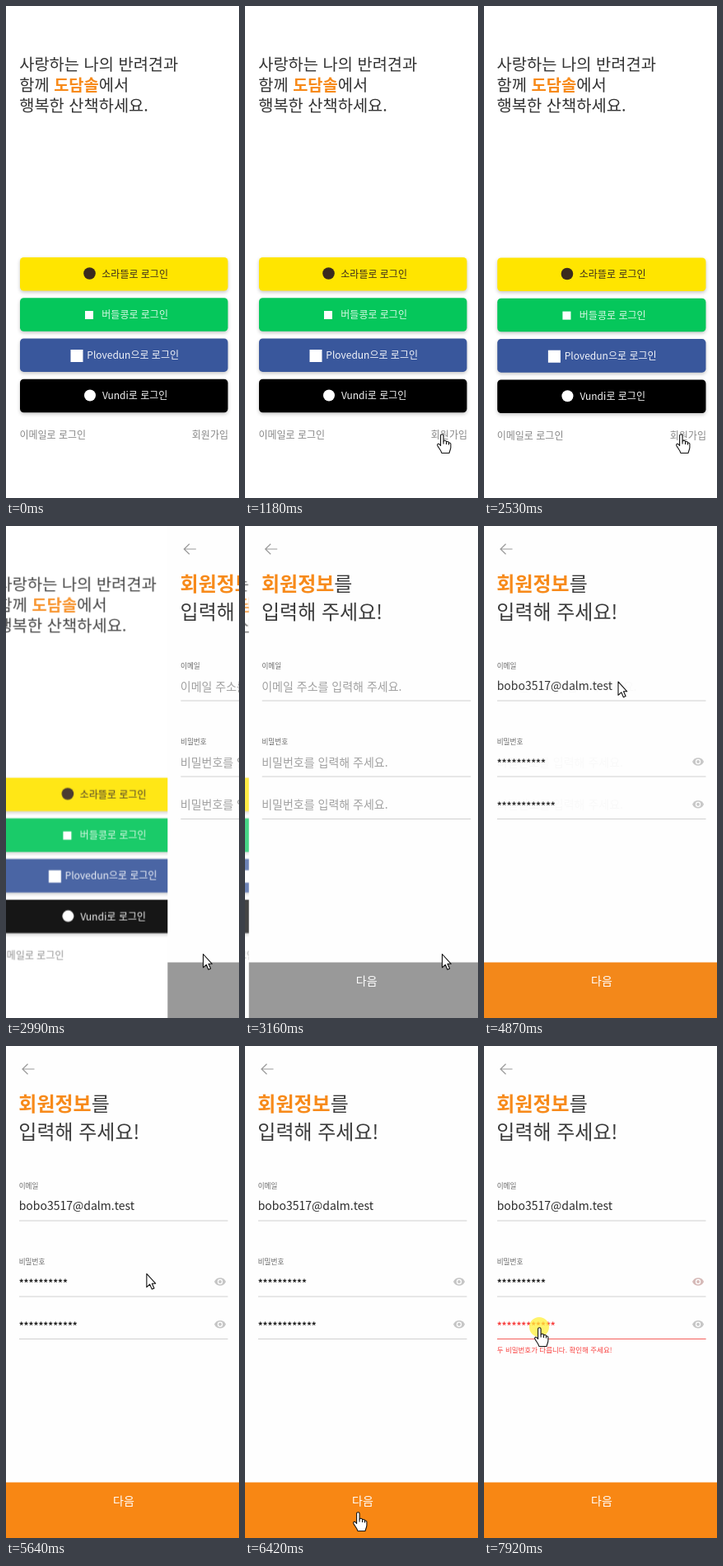
Animation of 283x597 px, one loop 8 s. Source, as an HTML page:

```html
<!DOCTYPE html>
<html lang="ko">
<head>
<meta charset="utf-8">
<style>
  html, body { margin: 0; height: 100%; overflow: hidden; background: #fff; }
  svg { display: block; width: 100vw; height: 100vh; font-family: "Noto Sans CJK KR", "Noto Sans CJK", "Noto Sans", sans-serif; }
  .button { filter: drop-shadow(0 2px 2px rgba(0, 0, 0, .22)); }
  .bold { font-weight: 700; fill: #f78a1a; }
  .pointer { fill: #fff; stroke: #111; stroke-width: 1.1; stroke-linejoin: round; }
</style>
</head>
<body>
<svg id="stage" viewBox="0 0 283 597"></svg>
<script>
const text = (x, y, size, fill, str, more = '') =>
  `<text x="${x}" y="${y}" font-size="${size}" fill="${fill}" ${more}>${str}</text>`;

const button = (y, bg, fg, x, label, icon) =>
  `<rect class="button" x="17" y="${y}" width="252.5" height="40.5" rx="4.5" fill="${bg}"/>` +
  icon + text(x, y + 24.7, 12, fg, label);

const dot = (x, y, r, fill) => `<circle cx="${x}" cy="${y}" r="${r}" fill="${fill}"/>`;
const box = (x, y, s) => `<rect x="${x}" y="${y}" width="${s}" height="${s}" fill="#fff"/>`;
const rule = (y, stroke, more = '') => `<path d="M16 ${y}H269.5" stroke="${stroke}" ${more}/>`;
const stars = (y, n, fill) => text(15.7, y, 11.7, fill, '*'.repeat(n), 'font-weight="700"');
const eye = (y, id) =>
  `<g id="${id}" fill="#c6c6c6" transform="translate(252.4 ${y - 7.6}) scale(.636)">
    <path d="M12 4.5C7 4.5 2.7 7.6 1 12c1.7 4.4 6 7.5 11 7.5s9.3-3.1 11-7.5c-1.7-4.4-6-7.5-11-7.5z"/>
    <circle cx="12" cy="12" r="5" fill="#fff"/><circle cx="12" cy="12" r="3"/></g>`;

const hint = '비밀번호를 입력해 주세요.';

stage.innerHTML = `
<g id="login">
  ${text(16.2, 78, 19.8, '#333', '사랑하는 나의 반려견과')}
  ${text(16.2, 103, 19.8, '#333', '함께 <tspan class="bold">도담솔</tspan>에서')}
  ${text(16.2, 128, 19.8, '#333', '행복한 산책하세요.')}
  ${button(305, '#ffe500', '#3a2d1c', 116.3, '소라뜰로 로그인', dot(101.5, 324.5, 7.3, '#3a2a1e'))}
  ${button(354.2, '#05c75b', '#d9f8e5', 116.3, '버들콩로 로그인', box(96, 370, 10))}
  ${button(403.4, '#39579c', '#f3f5fa', 98.3, 'Plovedun으로 로그인', box(78.5, 417, 15))}
  ${button(452.7, '#000', '#f4f4f4', 117, 'Vundi로 로그인', dot(102, 472.5, 7, '#fff'))}
  ${text(16.5, 524.6, 12, '#888', '이메일로 로그인')}
  ${text(270, 524.6, 12, '#888', '회원가입', 'text-anchor="end"')}
</g>
<g id="form">
  <rect width="283" height="597" fill="#fefefe"/>
  <path d="M34.5 28H20M26.5 21.7L20 28l6.5 6.3" fill="none" stroke="#999" stroke-width="1.2"/>
  ${text(15.3, 79, 24, '#3b3b3b', '<tspan class="bold">회원정보</tspan>를')}
  ${text(15.3, 113, 24, '#3b3b3b', '입력해 주세요!')}
  ${text(15.7, 172.6, 8.6, '#666', '이메일')}
  ${text(15.7, 264.6, 8.6, '#666', '비밀번호')}
  ${rule(212, '#d0d0d0')}${rule(304, '#d0d0d0')}${rule(355.5, '#d0d0d0')}
  <g id="hints">
    ${text(15.5, 199.7, 14, '#a0a0a0', '이메일 주소를 입력해 주세요.')}
    ${text(15.5, 291.7, 14, '#a0a0a0', hint)}
    ${text(15.5, 343.2, 14, '#a0a0a0', hint)}
  </g>
  <g id="values">
    ${text(15.7, 199.4, 14, '#2b2b2b', 'bobo3517@dalm.test')}
    ${stars(292, 10, '#222')}
    <g id="repeat">${stars(343.5, 12, '#222')}</g>
    ${eye(286, 'eye1')}${eye(337.7, 'eye2')}
  </g>
  <g id="error">
    ${stars(343.5, 12, '#f8403f')}
    ${rule(355.5, '#f4605c')}
    ${text(15.7, 371.6, 8.5, '#f8403f', '두 비밀번호가 다릅니다. 확인해 주세요!')}
  </g>
  <rect id="bar" y="529.5" width="283" height="68"/>
  ${text(143, 557, 14, '#fff', '다음', 'text-anchor="middle"')}
</g>
<g id="cursor">
  <circle id="glow" r="12" fill="#ffee32" opacity=".72"/>
  <path id="arrow" class="pointer" d="M.5 .5V16.8L4.3 13.3l2.6 5.9 2.7-1.2-2.6-5.7H11.3Z"/>
  <g id="hand" class="pointer" transform="translate(.5 .5)">
    <path d="M-1.9 2C-1.9-.4 1.6-.4 1.6 2V9C1.6 7.3 5 7.4 5 9.2V10C5 8.6 8 8.7 8 10.4v.8C8 10 10.4 10.2 10.4 12v4c0 3-1.5 4-1.8 7H-.6C-1 20-4.7 16.5-5.8 13.6-6.2 11.8-4.2 11-3 12.6L-1.9 14Z"/>
    <path d="M1.6 9v3M5 10v2.5M8 11v2" fill="none"/>
  </g>
</g>`;

const $ = id => document.getElementById(id);
const set = (id, attr, value) => $(id).setAttribute(attr, value);
const show = (id, on) => set(id, 'visibility', on ? 'visible' : 'hidden');
const clamp = u => Math.max(0, Math.min(1, u));
const settle = (t, start, length) => 1 - (1 - clamp((t - start) / length)) ** 3;
const mix = (a, b, p) => `rgb(${a.map((v, i) => Math.round(v + (b[i] - v) * p))})`;

const speedUp = u => u * u;
const slowDown = u => u * (2 - u);
const smooth = u => u * u * (3 - 2 * u);

// time, x, y, easing towards that point
const path = [
  [40, 253, 602], [500, 234, 516, slowDown], [860, 234, 516, smooth], [1180, 239, 519, smooth],
  [3180, 239, 519, smooth], [3770, 189, 401, speedUp], [4060, 167, 179, slowDown],
  [4200, 167, 179, smooth], [4260, 162.5, 188, smooth], [4920, 162.5, 188.5, smooth],
  [5500, 173, 253, speedUp], [6350, 137, 565, smooth], [6850, 137, 565, smooth],
  [7180, 141, 491, speedUp], [7650, 67, 333, slowDown], [7720, 67, 341, smooth]
];
const clicks = [[2260, 2400], [4330, 4460], [6550, 6690], [7920, 8000]];

function cursorAt(t) {
  const i = path.findIndex(k => k[0] > t);
  if (i === 0) return path[0].slice(1, 3);
  if (i < 0) return path[path.length - 1].slice(1, 3);
  const [t0, x0, y0] = path[i - 1], [t1, x1, y1, ease] = path[i];
  const p = ease((t - t0) / (t1 - t0));
  return [x0 + (x1 - x0) * p, y0 + (y1 - y0) * p];
}

function draw(t) {
  const slide = settle(t, 2960, 270);
  const filled = settle(t, 4680, 300);
  const failed = settle(t, 6700, 300);

  // the login page grows slightly once pressed
  const grow = t < 2400 ? 0 : t < 2530 ? .5 : 1;
  set('login', 'transform', `translate(${-85 * slide} 0) translate(285 70)
    scale(${1 + .003 * grow} ${1 + .002 * grow}) translate(-285 -70)`);
  set('login', 'opacity', 1 - .27 * slide);
  set('form', 'transform', `translate(${283 * (1 - slide)} 0)`);
  show('form', slide > 0);

  set('hints', 'opacity', 1 - filled);
  set('values', 'opacity', filled);
  set('bar', 'fill', mix([153, 153, 153], [248, 135, 20], filled));
  set('error', 'opacity', failed);
  set('repeat', 'opacity', 1 - failed);
  set('eye1', 'fill', mix([198, 198, 198], [214, 186, 184], failed));

  const [x, y] = cursorAt(t);
  const onLink = t < 2960 && y < 528;
  const onForm = t > 5500 && (y > 529 || t > 7000 && y < 356);
  const hand = onLink || onForm;
  set('cursor', 'transform', `translate(${x} ${y})`);
  show('hand', hand);
  show('arrow', !hand);
  show('glow', clicks.some(([from, to]) => t >= from && t < to));
}

function loop() {
  draw(performance.now() % 8000);
  requestAnimationFrame(loop);
}
loop();
</script>
</body>
</html>
```
